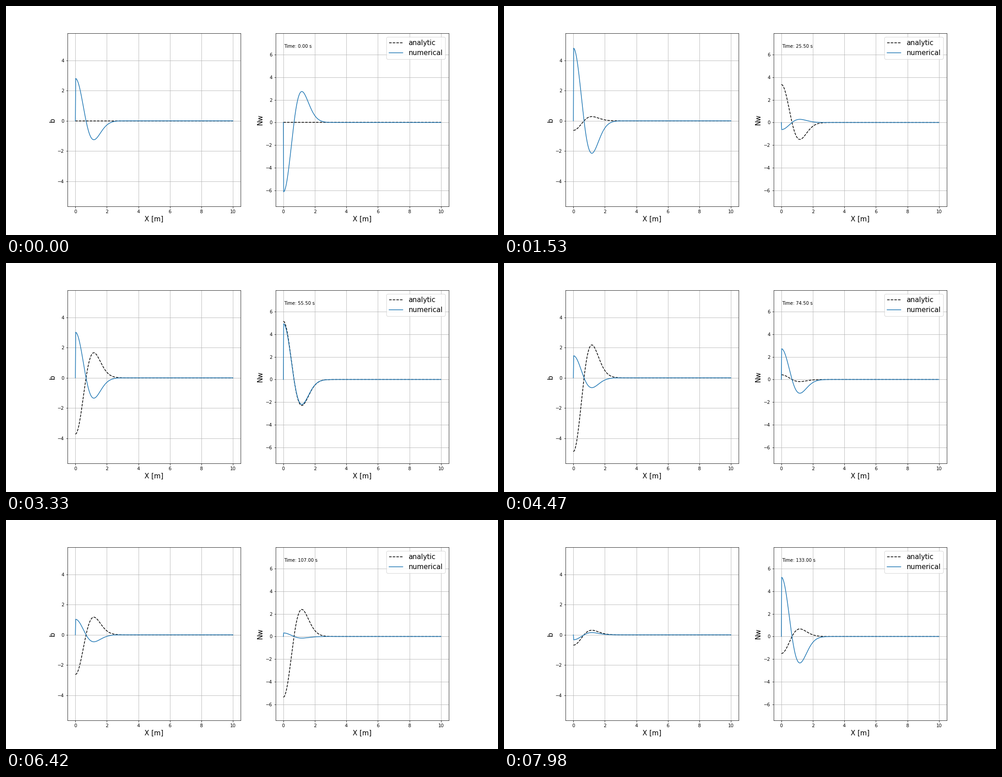
These frames come from a looping animation (1080x504 px, 8000 ms). A matplotlib script:

```python
import numpy as np
import matplotlib.pyplot as plt
from matplotlib.animation import FuncAnimation

FRAMES = 267
LOOP_MS = 8000
DT = 0.5                # simulated seconds per frame

N = 0.02                # buoyancy frequency
OMEGA = 2 * np.pi / 100  # forcing frequency
AMP = 3.71
LAG = 200               # time offset of the numerical run
WIDTH = 0.677

x = np.linspace(0, 10, 501)
profile = (1 - (x / WIDTH) ** 2) * np.exp(-0.5 * (x / WIDTH) ** 2)
clamped = profile.copy()
clamped[[0, -1]] = 0    # fixed boundary values


def buoyancy(t):
    return -AMP * (np.sin(N * t) - N / OMEGA * np.sin(OMEGA * t))


def velocity(t):
    return AMP * (np.cos(N * t) - np.cos(OMEGA * t))


plt.rcParams["font.family"] = "DejaVu Sans"
fig, axes = plt.subplots(1, 2, figsize=(15, 7), dpi=72, facecolor="white")
fig.subplots_adjust(left=0.125, right=0.9, bottom=0.125, top=0.88, wspace=0.2)


def setup(ax, name, ylim):
    ax.set_xlim(-0.5, 10.5)
    ax.set_ylim(*ylim)
    ax.set_xlabel("X [m]", fontsize=15)
    ax.set_ylabel(name, fontsize=15)
    ax.grid(True)
    analytic, = ax.plot(x, 0 * x, "k--", label="analytic")
    numerical, = ax.plot(x, 0 * x, color="tab:blue", label="numerical")
    return analytic, numerical


panels = [
    (buoyancy, setup(axes[0], "b", (-5.663, 5.781))),
    (velocity, setup(axes[1], "Nw", (-7.408, 7.862))),
]
axes[1].legend(loc="upper right", fontsize=15)
clock = axes[1].text(0.05, 0.917, "", transform=axes[1].transAxes)


def update(frame):
    t = frame * DT
    for amplitude, (analytic, numerical) in panels:
        analytic.set_ydata(amplitude(t) * profile)
        numerical.set_ydata(amplitude(t + LAG) * clamped)
    clock.set_text(f"Time: {t:.2f} s")
    return [clock] + [line for _, lines in panels for line in lines]


anim = FuncAnimation(fig, update, frames=FRAMES, interval=LOOP_MS / FRAMES,
                     repeat=True, repeat_delay=0)
plt.show()
```
